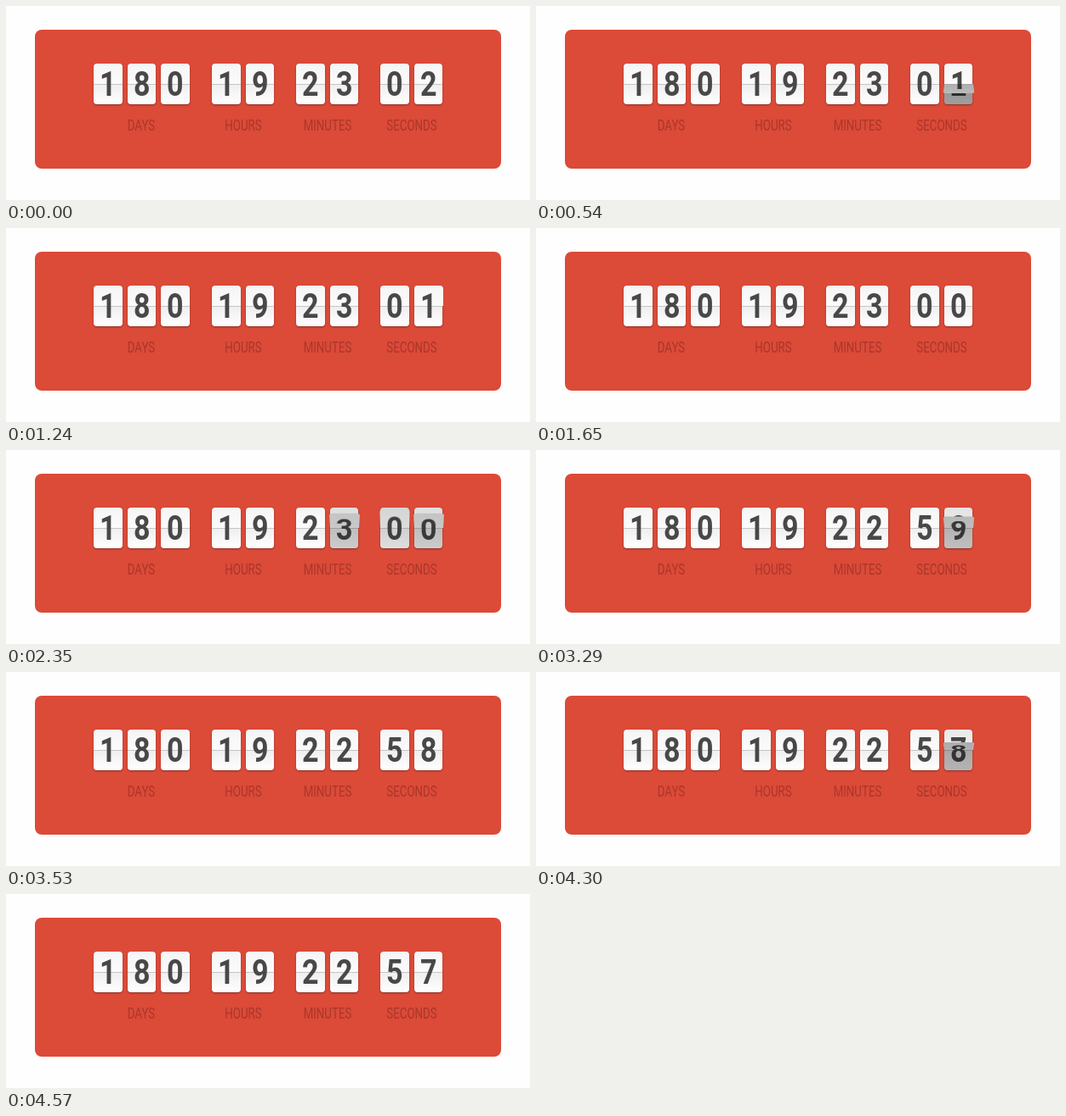
An HTML page that plays this animation: 616 by 229 pixels, repeating every 4.77 s.

```html
<!DOCTYPE html>
<html lang="en">
<head>
<meta charset="utf-8">
<title>Countdown</title>
<style>
html, body { margin: 0; width: 100%; height: 100%; overflow: hidden; background: #fefefe; }
body { position: relative; font-family: Roboto, "Liberation Sans", sans-serif; }
.panel { position: absolute; left: 34px; top: 28px; width: 548px; height: 164px; border-radius: 8px; background: #dc4a38; }
.card {
  position: absolute; top: 68px; width: 33.5px; height: 48px; border-radius: 4px;
  perspective: 300px; box-shadow: 0 1px 2px rgba(0, 0, 0, .38);
}
.half { position: absolute; left: 0; width: 100%; height: 24px; overflow: hidden; backface-visibility: hidden; }
.top { top: 0; border-radius: 4px 4px 0 0; background: linear-gradient(#f5f5f5, #fbfbfb); transform-origin: bottom; }
.bottom { top: 24px; border-radius: 0 0 4px 4px; background: linear-gradient(#c6c6c6 1px, #efefef 1px, #fff); transform-origin: top; }
.half::after { content: ""; position: absolute; inset: 0; background: #000; opacity: var(--shade, 0); }
.half span {
  position: absolute; left: 0; top: 0; width: 100%; display: flex; justify-content: center;
  font: bold 41px/48px Roboto, "Liberation Sans", sans-serif; color: #484848; transform: scaleX(.83);
}
.bottom span { top: -24px; }
.label {
  position: absolute; top: 129px; font-size: 19px; line-height: 24px; color: #a9372a;
  transform: translateX(-50%) scaleX(.7);
}
</style>
</head>
<body>
<div class="panel"></div>
<script>
const LOOP = 4770, START = 23 * 60 + 2;
const FLIPS = [[270, 470], [1240, 410], [2180, 470], [3130, 400], [4090, 480]]; // start, duration
const GROUPS = [["DAYS", 103, 3], ["HOURS", 242, 2], ["MINUTES", 341, 2], ["SECONDS", 440, 2]];
const STEP = 39.5, WIDTH = 33.5;

function add(parent, tag, cls) {
  const el = parent.appendChild(document.createElement(tag));
  el.className = cls;
  return el;
}

function addHalf(card, cls) {
  const el = add(card, "div", "half " + cls);
  const text = add(el, "span", "");
  return { el, text };
}

const cards = [];
for (const [name, x, count] of GROUPS) {
  for (let i = 0; i < count; i++) {
    const card = add(document.body, "div", "card");
    card.style.left = x + i * STEP + "px";
    // back halves, then the two faces of the falling flap
    cards.push(["top", "bottom", "top", "bottom"].map(cls => addHalf(card, cls)));
  }
  const label = add(document.body, "div", "label");
  label.textContent = name;
  label.style.left = x + ((count - 1) * STEP + WIDTH) / 2 + "px";
}

function digits(total) {
  const pad = n => String(n).padStart(2, "0");
  return "18019" + pad(Math.floor(total / 60)) + pad(total % 60);
}

function setHalf({ el, text }, digit, angle, shade) {
  text.textContent = digit;
  el.style.transform = angle ? `rotateX(${angle}deg)` : "none";
  el.style.visibility = Math.abs(angle) < 90 ? "visible" : "hidden";
  el.style.setProperty("--shade", shade);
}

const clamp = v => Math.min(1, Math.max(0, v));
const ease = p => p < .5 ? 2 * p * p : 1 - 2 * (1 - p) ** 2;

function drawCard([top, bottom, front, back], from, to, p) {
  const turn = from === to ? 0 : ease(p);
  const fall = clamp(turn * 2), land = clamp(turn * 2 - 1);
  const idle = turn === 0 || turn === 1;
  const now = turn === 1 ? to : from;
  setHalf(top, idle ? now : to, 0, idle ? 0 : .2 * (1 - fall));
  setHalf(bottom, now, 0, idle ? 0 : .38 * fall);
  setHalf(front, from, idle ? 90 : -90 * fall, .38 * fall);
  setHalf(back, to, idle ? 90 : 90 * (1 - land), .38 * (1 - land));
}

function draw(t) {
  const k = FLIPS.filter(([start]) => start <= t).length - 1;
  const [start, duration] = FLIPS[Math.max(k, 0)];
  const from = digits(START - Math.max(k, 0)), to = digits(START - Math.max(k, 0) - 1);
  cards.forEach((card, i) => {
    const delay = i === 7 ? 50 : 0; // tens of seconds follow a little later
    drawCard(card, from[i], to[i], clamp((t - start - delay) / (duration - delay)));
  });
}

const begin = performance.now();
function tick() {
  draw((performance.now() - begin) % LOOP);
  requestAnimationFrame(tick);
}
tick();
</script>
</body>
</html>
```
